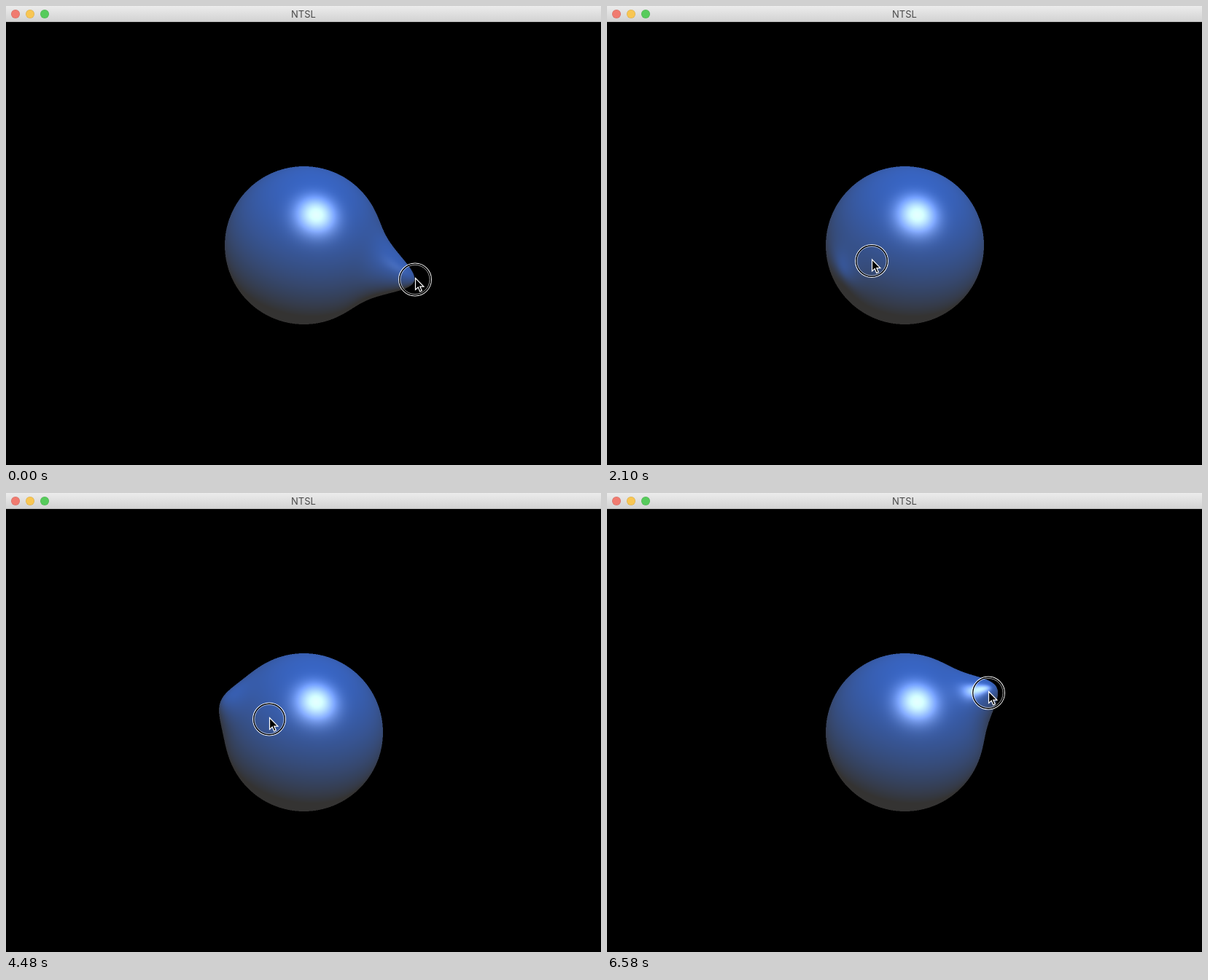
Animation of 816x630 px, one loop 6.79 s. Source, as an HTML page with a canvas:

```html
<!DOCTYPE html>
<html lang="en">
<head>
<meta charset="utf-8">
<title>NTSL</title>
<style>
  html, body { margin: 0; width: 100%; height: 100%; overflow: hidden; background: #000; }
  #stage { position: relative; width: 816px; height: 630px; overflow: hidden; background: #000; }
  #bar {
    position: absolute; inset: 0 0 auto; height: 22px; box-sizing: border-box;
    border-bottom: 1px solid #bcbcbc;
    background: linear-gradient(#ececec, #d3d3d3);
    font: 13px/22px Inter, "Liberation Sans", sans-serif; color: #4a4a4a; text-align: center;
  }
  #bar i {
    position: absolute; top: 5px; width: 12px; height: 12px; border-radius: 50%;
    box-shadow: inset 0 0 0 .6px rgba(0, 0, 0, .12);
  }
  #blob { position: absolute; left: 250px; top: 200px; width: 350px; height: 250px; }
  #over { position: absolute; left: 0; top: 0; }
</style>
</head>
<body>
<div id="stage">
  <div id="bar">
    <i style="left:7px;background:#f07b70"></i>
    <i style="left:27px;background:#f8c653"></i>
    <i style="left:47px;background:#57cb5c"></i>NTSL
  </div>
  <canvas id="blob" width="700" height="500"></canvas>
  <svg id="over" width="816" height="630">
    <g id="brush" fill="none">
      <circle r="22.4" stroke="#fff" stroke-width="1.1"/>
      <circle r="21.2" stroke="#000" stroke-width="1.4"/>
      <circle r="20.1" stroke="#fff" stroke-width=".8" opacity=".75"/>
      <path transform="translate(.5 -2)" d="M0 0V16L3.7 12.6 6.2 18.4 8.8 17.3 6.3 11.6H11.4Z"
        fill="#000" stroke="#fff" stroke-width="1.2"/>
    </g>
  </svg>
</div>
<script>
const LOOP = 6790, R = 108.5, CX = 408.5, CY = 328.5, SPREAD = 0.22;
const LEFT = 250, TOP = 200, SCALE = 2;
const RINGS = 120, SEGS = 140;

// Brush: step, x, y
const moves = [
  [0, 561, 375.5], [3, 452, 340], [8, 363, 350], [10, 352, 347], [12, 311.5, 271.5],
  [14, 276, 270], [17, 361, 310.5], [20, 459.5, 309.5], [21, 459.5, 309.5],
  [25, 523, 274.5], [26, 561, 375.5]
];

// Bump: step, angle in degrees, pull beyond the rim
const pulls = [
  [0, 18, 52], [2, 9.5, 19], [5, 9.5, 19],
  [6, 155.5, 0], [10, 155.5, 0], [12, 179, 3], [14, 200, 26], [16, 200, 14.5], [17, 200, 14.5],
  [18, 338, 0], [21, 338, 0], [25, 334, 33], [26, 378, 52]
];

// Eased values between the keys around a step
function between(keys, step) {
  const i = keys.findIndex(k => k[0] > step);
  const [s0, ...a] = keys[i - 1], [s1, ...b] = keys[i];
  const u = (step - s0) / (s1 - s0), e = u * u * (3 - 2 * u);
  return a.map((v, k) => v + (b[k] - v) * e);
}

const dot = (a, b) => a[0] * b[0] + a[1] * b[1] + a[2] * b[2];
const cross = (a, b) => [
  a[1] * b[2] - a[2] * b[1], a[2] * b[0] - a[0] * b[2], a[0] * b[1] - a[1] * b[0]
];
const unit = v => { const l = Math.hypot(...v); return v.map(c => c / l); };

const light = unit([0.15, -0.74, 0.65]);
const half = unit([0.156, -0.385, 0.91]);

const canvas = document.getElementById('blob');
const ctx = canvas.getContext('2d');
const brush = document.getElementById('brush');
const W = canvas.width, H = canvas.height;
const image = ctx.createImageData(W, H);
const depth = new Float32Array(W * H);

// Polar grid around the bump: position and normal of each vertex
function buildMesh(angle, out) {
  const c0 = Math.cos(angle * Math.PI / 180), s0 = Math.sin(angle * Math.PI / 180);
  const rim = Math.min(107, 100 + out / 2);
  const lift = 28 + 5 * c0 - out / 2;
  const pull = [out * c0, out * s0, lift];
  const a = unit([rim * c0, rim * s0, Math.sqrt(R * R - rim * rim)]);
  const e1 = unit(cross(a, [0, 1, 0])), e2 = cross(a, e1);
  const rows = [];
  for (let i = 0; i <= RINGS; i++) {
    const th = Math.PI * Math.pow(i / RINGS, 1.5);
    const w = Math.exp(-th * th / (2 * SPREAD * SPREAD));
    const slope = -th / (SPREAD * SPREAD) * w;
    const ct = Math.cos(th), st = Math.sin(th), row = [];
    for (let j = 0; j <= SEGS; j++) {
      const ph = 2 * Math.PI * j / SEGS, c = Math.cos(ph), s = Math.sin(ph);
      const dir = a.map((v, k) => ct * v + st * (c * e1[k] + s * e2[k]));
      const tilt = cross(pull, e1.map((v, k) => c * e2[k] - s * v));
      const p = dir.map((v, k) => R * v + w * pull[k]);
      row.push({
        x: (p[0] + CX - LEFT) * SCALE, y: (p[1] + CY - TOP) * SCALE, z: p[2],
        n: unit(dir.map((v, k) => R * v + slope * tilt[k]))
      });
    }
    rows.push(row);
  }
  return rows;
}

function shade(at, nx, ny, nz) {
  const l = Math.hypot(nx, ny, nz) || 1, n = [nx / l, ny / l, nz / l];
  const d = Math.max(0, (dot(n, light) + 0.38) / 1.38);
  const s = Math.pow(Math.max(0, dot(n, half)), 31);
  const px = image.data;
  px[at] = 52 + 4 * d + 172 * s;
  px[at + 1] = 51 + 50 * d + 172 * s;
  px[at + 2] = 50 + 146 * d + 175 * s;
  px[at + 3] = 255;
}

function triangle(a, b, c) {
  if (a.n[2] < 0 && b.n[2] < 0 && c.n[2] < 0) return;
  const area = (b.x - a.x) * (c.y - a.y) - (c.x - a.x) * (b.y - a.y);
  if (!area) return;
  const x0 = Math.max(0, Math.ceil(Math.min(a.x, b.x, c.x) - 0.5));
  const x1 = Math.min(W - 1, Math.floor(Math.max(a.x, b.x, c.x) - 0.5));
  const y0 = Math.max(0, Math.ceil(Math.min(a.y, b.y, c.y) - 0.5));
  const y1 = Math.min(H - 1, Math.floor(Math.max(a.y, b.y, c.y) - 0.5));
  const edge = -1e-6;
  for (let y = y0; y <= y1; y++) for (let x = x0; x <= x1; x++) {
    const px = x + 0.5, py = y + 0.5;
    const u = ((b.x - px) * (c.y - py) - (c.x - px) * (b.y - py)) / area;
    const v = ((c.x - px) * (a.y - py) - (a.x - px) * (c.y - py)) / area;
    const w = 1 - u - v;
    if (u < edge || v < edge || w < edge) continue;
    const z = u * a.z + v * b.z + w * c.z, i = y * W + x;
    if (z <= depth[i]) continue;
    depth[i] = z;
    const mix = k => u * a.n[k] + v * b.n[k] + w * c.n[k];
    shade(i * 4, mix(0), mix(1), mix(2));
  }
}

function drawBlob(angle, out) {
  image.data.fill(0);
  depth.fill(-1e9);
  const rows = buildMesh(angle, out);
  for (let i = 0; i < RINGS; i++) for (let j = 0; j < SEGS; j++) {
    const p = rows[i], q = rows[i + 1];
    triangle(p[j], q[j], q[j + 1]);
    triangle(p[j], q[j + 1], p[j + 1]);
  }
  ctx.putImageData(image, 0, 0);
}

// Steps come in groups of four: 280, 280, 280 and 210 ms
const stepAt = t => 4 * Math.floor(t / 1050) + Math.min(3, Math.floor(t % 1050 / 280));

let shown = -1;
function show(t) {
  const step = stepAt(t);
  if (step === shown) return;
  shown = step;
  drawBlob(...between(pulls, step));
  brush.setAttribute('transform', `translate(${between(moves, step)})`);
}

show(0);
const start = performance.now();
function tick() {
  show((performance.now() - start) % LOOP);
  requestAnimationFrame(tick);
}
requestAnimationFrame(tick);
</script>
</body>
</html>
```
